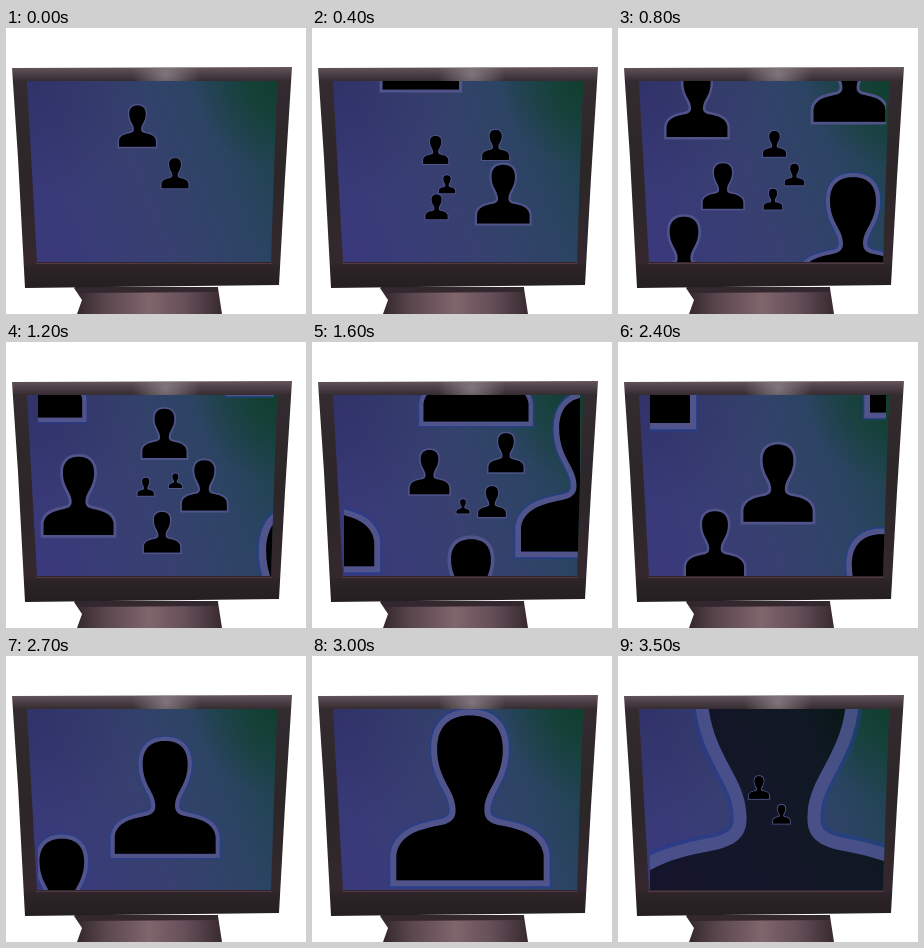
Animation, 300 px wide and 286 px high, one loop 3.6 s. Source, as an HTML page with a canvas:

```html
<!DOCTYPE html>
<html lang="en">
<head>
<meta charset="utf-8">
<title>People on a monitor</title>
<style>
html, body { margin: 0; width: 100%; height: 100%; overflow: hidden; background: #fff; }
canvas { display: block; width: 100%; height: 100%; }
</style>
</head>
<body>
<canvas id="stage" width="300" height="286"></canvas>
<script>
const ctx = document.getElementById('stage').getContext('2d');
const STEP = 100, TICKS = 36, CYCLE = 35;
const ORIGIN = 155, SEED = 14, GROWTH = 1.2;

// Keys are [step, centre x, bottom y, width]; a lone step is a birth at the origin.
const crowd = [
  [[34, 141, 143.5, 22], [35, 131.5, 120, 40]],
  [[34, 163.5, 168, 18], [35, 169, 161, 29], [43, 235, 268, 112]],
  [[1], [8, 79, 111, 66]],
  [[1], [8, 231.5, 96, 78]],
  [[2], [8, 66, 263, 70]],
  [[3], [8, 105, 182, 44], [15, -10, 229, 157]],
  [[5], [8, 156.5, 129.5, 25], [15, 164, 83, 114]],
  [[6], [8, 176.5, 158, 21], [15, 278, 214, 150]],
  [[6], [8, 155, 182, 20], [15, 159, 300, 97]],
  [[10], [15, 117.5, 153.5, 43], [19, 75, 124, 82], [23, -4, 86, 165]],
  [[11], [15, 194, 131.5, 38], [19, 237, 114, 72], [23, 321, 75, 150]],
  [[12], [15, 180, 176, 30], [19, 216.5, 228, 67], [23, 264, 348, 147]],
  [[15, 151, 172, 14], [19, 127.5, 190, 29], [23, 97, 236, 63]]
];
const hero = [[16], [19, 160, 160, 32], [23, 160, 182, 75], [29, 158, 229, 160], [34, 159, 321, 340]];

const body = new Path2D(`M-.46-.03 L-.46-.19 C-.44-.32-.3-.35-.2-.37
  C-.11-.385-.085-.42-.09-.48 C-.095-.6-.205-.66-.205-.85
  C-.205-1-.12-1.06 0-1.06 C.12-1.06.205-1 .205-.85
  C.205-.66.095-.6.09-.48 C.085-.42.11-.385.2-.37
  C.3-.35.44-.32.46-.19 L.46-.03 Z`);
const outside = new Path2D('M-2-3 H2 V2 H-2 Z');
outside.addPath(body);

const screen = new Path2D('M21 53 H271 L265 234 H31 Z');
const view = new Path2D('M32 53 H268 V140 L265 234 H32 Z');
const shell = new Path2D('M6 40 L286 39 L279 150 L273 257 L19 260 L12 130 Z');
const stand = new Path2D('M68 260 H212 L216 286 H71 L76 272 Z');
const standShade = new Path2D('M68 259 H212 V264 L75 265 Z');

function shade(g, stops) {
  stops.forEach(([at, color]) => g.addColorStop(at, color));
  return g;
}

function linear(x0, y0, x1, y1, stops) {
  return shade(ctx.createLinearGradient(x0, y0, x1, y1), stops);
}

function glow(x, y, r, rgb, alpha) {
  return shade(ctx.createRadialGradient(x, y, 0, x, y, r),
    [[0, `rgba(${rgb},${alpha})`], [1, `rgba(${rgb},0)`]]);
}

function fill(path, style) {
  ctx.fillStyle = style;
  ctx.fill(path);
}

const shellPaint = linear(0, 39, 0, 260, [[0, '#66555d'], [.03, '#4c4046'], [.065, '#332b2f'],
  [.5, '#2c2628'], [.88, '#34282e'], [.91, '#2b2326'], [1, '#251f21']]);
const screenPaint = linear(22, 190, 271, 90, [[0, '#3a397c'], [.45, '#37406f'],
  [.75, '#2c4464'], [1, '#1b4349']]);
const standPaint = linear(70, 0, 216, 0, [[0, '#33272c'], [.2, '#5a464e'], [.5, '#80656c'],
  [.75, '#654f58'], [1, '#382a30']]);
const greenCorner = glow(272, 54, 85, '14,62,38', .8);
const dimCorner = glow(24, 54, 120, '38,38,88', .45);
const lamp = glow(160, 46, 34, '145,135,140', .75);

function drawMonitor() {
  fill(stand, standPaint);
  fill(standShade, '#33282e');
  fill(shell, shellPaint);
  ctx.fillStyle = lamp;
  ctx.fillRect(120, 40, 80, 13);
  ctx.fillStyle = '#503844';
  ctx.fillRect(30, 235, 236, 1);
  fill(screen, screenPaint);
  fill(screen, dimCorner);
  fill(screen, greenCorner);
}

// A newborn lies on the line from the origin to its first full key.
function withBirth([first, ...rest]) {
  if (first.length > 1) return [first, ...rest];
  const [, x, y, w] = rest[0];
  const p = SEED / w;
  return [[first[0], ORIGIN + (x - ORIGIN) * p, ORIGIN + (y - ORIGIN) * p, SEED], ...rest];
}

// Width grows exponentially; position follows the width.
function poseAt(keys, k) {
  let i = 0;
  while (i < keys.length - 2 && k >= keys[i + 1][0]) i++;
  const [k0, x0, y0, w0] = keys[i];
  const [k1, x1, y1, w1] = keys[i + 1];
  const w = k > k1 ? w1 * GROWTH ** (k - k1) : w0 * (w1 / w0) ** ((k - k0) / (k1 - k0));
  const p = (w - w0) / (w1 - w0);
  return { x: x0 + (x1 - x0) * p, y: y0 + (y1 - y0) * p, w };
}

function rim(width, color) {
  ctx.lineWidth = width * 2;
  ctx.strokeStyle = color;
  ctx.stroke(body);
}

function drawPerson(keys, k, fade = 1) {
  if (k < keys[0][0]) return;
  const { x, y, w } = poseAt(keys, k);
  if (w > 700) return;
  ctx.save();
  ctx.translate(x, y);
  ctx.scale(w, w);
  ctx.save();
  ctx.clip(outside, 'evenodd');
  ctx.globalAlpha = fade < 1 ? .8 : 1;
  if (w > 100) rim(.05, 'rgba(32,62,150,.6)');
  rim(Math.max(.038, 1 / w), '#51548a');
  ctx.restore();
  ctx.globalAlpha = fade;
  fill(body, '#000');
  ctx.restore();
}

const people = crowd.map(withBirth);
const lead = withBirth(hero);

function draw(time) {
  const tick = Math.floor(time / STEP) % TICKS;
  const k = tick >= 9 ? tick - 1 : tick;
  ctx.clearRect(0, 0, 300, 286);
  drawMonitor();
  ctx.save();
  ctx.clip(view);
  drawPerson(lead, k, Math.min(1, 1 - (k - 32) * .18));
  for (const keys of people) {
    const wraps = keys[0][0] === CYCLE - 1;
    drawPerson(keys, wraps && k < CYCLE - 1 ? k + CYCLE : k);
  }
  ctx.restore();
}

const start = performance.now();
function loop() {
  draw(performance.now() - start);
  requestAnimationFrame(loop);
}
loop();
</script>
</body>
</html>
```
